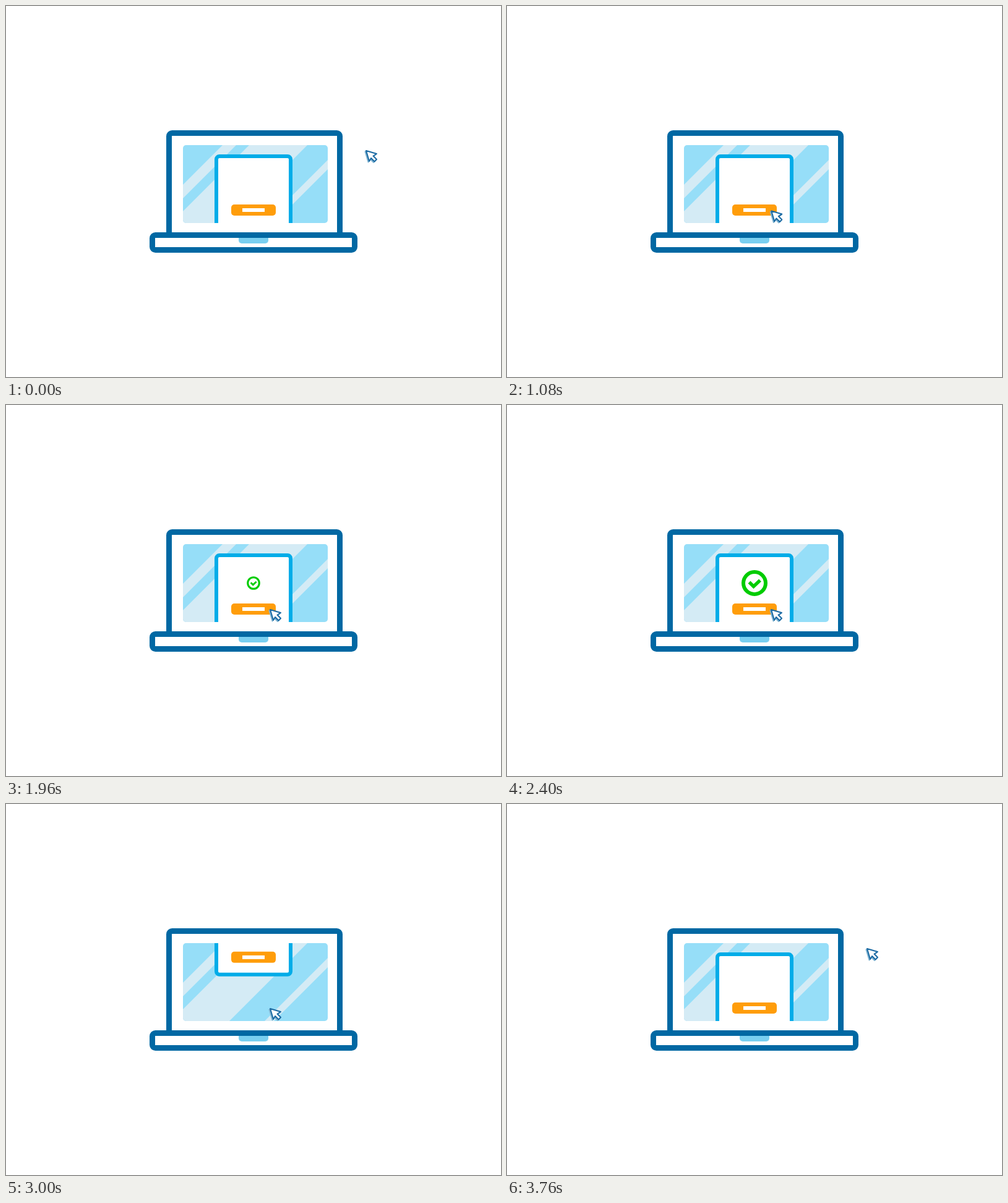
An HTML page for the animation above (3800 ms loop, 800 px wide and 600 px high).

```html
<!DOCTYPE html>
<html lang="en">
<head>
<meta charset="utf-8">
<title>Laptop click</title>
<style>
  html, body { margin: 0; width: 100%; height: 100%; overflow: hidden; background: #fff; }
  svg { display: block; width: 800px; height: 600px; }
</style>
</head>
<body>
<svg viewBox="0 0 800 600">
  <defs>
    <clipPath id="glass"><rect x="286" y="225" width="234" height="126" rx="5"/></clipPath>
    <g id="card">
      <rect x="340" y="243" width="120" height="115" rx="5" fill="#fff" stroke="#00ace8" stroke-width="6"/>
      <rect x="364" y="321" width="72" height="18" rx="5" fill="#ff9d0a"/>
      <rect x="382" y="327" width="36" height="6" fill="#fff"/>
    </g>
    <path id="arrow" d="M0 0 17 5 11.5 8.5 17 14 13.5 17.5 8 12 5 17Z" stroke-width="2" stroke-linejoin="round"/>
    <g id="cursor">
      <use href="#arrow" x="-1.5" y="1.5" fill="#7fb3d1" stroke="#7fb3d1"/>
      <use href="#arrow" fill="#fff" stroke="#1b6aa3"/>
    </g>
  </defs>

  <g fill="#fff" stroke="#0068a3" stroke-width="9">
    <path d="M263.5 370V210.5a5 5 0 0 1 5-5H534.5a5 5 0 0 1 5 5V370"/>
    <rect x="236.5" y="370.5" width="331" height="24" rx="5" id="base"/>
  </g>
  <path d="M376 375h48v4a5 5 0 0 1-5 5h-38a5 5 0 0 1-5-5z" fill="#79cff0"/>

  <g clip-path="url(#glass)">
    <rect x="286" y="225" width="234" height="126" fill="#96def8"/>
    <g id="stripes" fill="#d4ebf5"></g>
    <g id="oldCard">
      <use href="#card"/>
      <g id="check" fill="none" stroke="#00cc00">
        <circle r="18" stroke-width="6"/>
        <path d="M-8.5-1.5-1.5 5.5 9-4.5" stroke-width="5.5"/>
      </g>
    </g>
  </g>
  <path id="burst" fill="none" stroke="#1b6aa3" stroke-width="3" stroke-linecap="round"/>
  <use id="pointer" href="#cursor"/>
  <g clip-path="url(#glass)"><use id="newCard" href="#card"/></g>
  <use id="nextPointer" href="#cursor" x="582" y="234"/>
</svg>
<script>
  const LOOP = 3800, STEP = 40;
  const START = [582, 234], BEND = [463.5, 405.5], END = [427, 331];
  const CARD_TRAVEL = 197, BURST_RADIUS = 24;
  const el = id => document.getElementById(id);
  const span = (t, from, to) => Math.min(1, Math.max(0, (t - from) / (to - from)));
  const smooth = u => u * u * (3 - 2 * u);
  const easeOut = (u, power) => 1 - (1 - u) ** power;
  const move = (id, x, y, scale = 1) =>
    el(id).setAttribute('transform', `translate(${x} ${y}) scale(${scale})`);
  const show = (id, opacity) => el(id).setAttribute('opacity', +opacity);

  el('base').setAttribute('width', 327);

  // Diagonal reflections, each between two lines of constant x + y.
  el('stripes').innerHTML = [[575, 597], [618, 712], [769, 784]].map(([a, b]) =>
    `<path d="M${a - 225} 225H${b - 225}L${b - 351} 351H${a - 351}Z"/>`).join('');

  function rays(u) {
    const inner = BURST_RADIUS * smooth(u), outer = BURST_RADIUS * easeOut(u, 4);
    let d = '';
    for (let i = 0; i < 8; i++) {
      const c = Math.cos(i * Math.PI / 4), s = Math.sin(i * Math.PI / 4);
      d += `M${427.5 + c * inner} ${332.5 + s * inner}L${427.5 + c * outer} ${332.5 + s * outer}`;
    }
    return d;
  }

  function draw(t) {
    const s = smooth(span(t, 0, 1120));
    const [x, y] = START.map((p, i) =>
      (1 - s) ** 2 * p + 2 * s * (1 - s) * BEND[i] + s * s * END[i]);
    move('pointer', x, y);
    show('pointer', t < 3480);

    const bursting = t > 1400 && t < 1720;
    show('burst', bursting);
    if (bursting) el('burst').setAttribute('d', rays(span(t, 1400, 1720)));

    move('check', 400, 288, easeOut(span(t, 1840, 2400), 3));
    show('check', t >= 1880);

    // The finished card drops out while a fresh one follows from above.
    const drop = CARD_TRAVEL * smooth(span(t, 2400, 3480));
    move('oldCard', 0, drop);
    move('newCard', 0, drop - CARD_TRAVEL);
    show('newCard', t > 2400);
    show('nextPointer', span(t, 3440, 3720));
  }

  function tick() {
    draw(Math.floor(performance.now() % LOOP / STEP) * STEP);
    requestAnimationFrame(tick);
  }
  tick();
</script>
</body>
</html>
```
